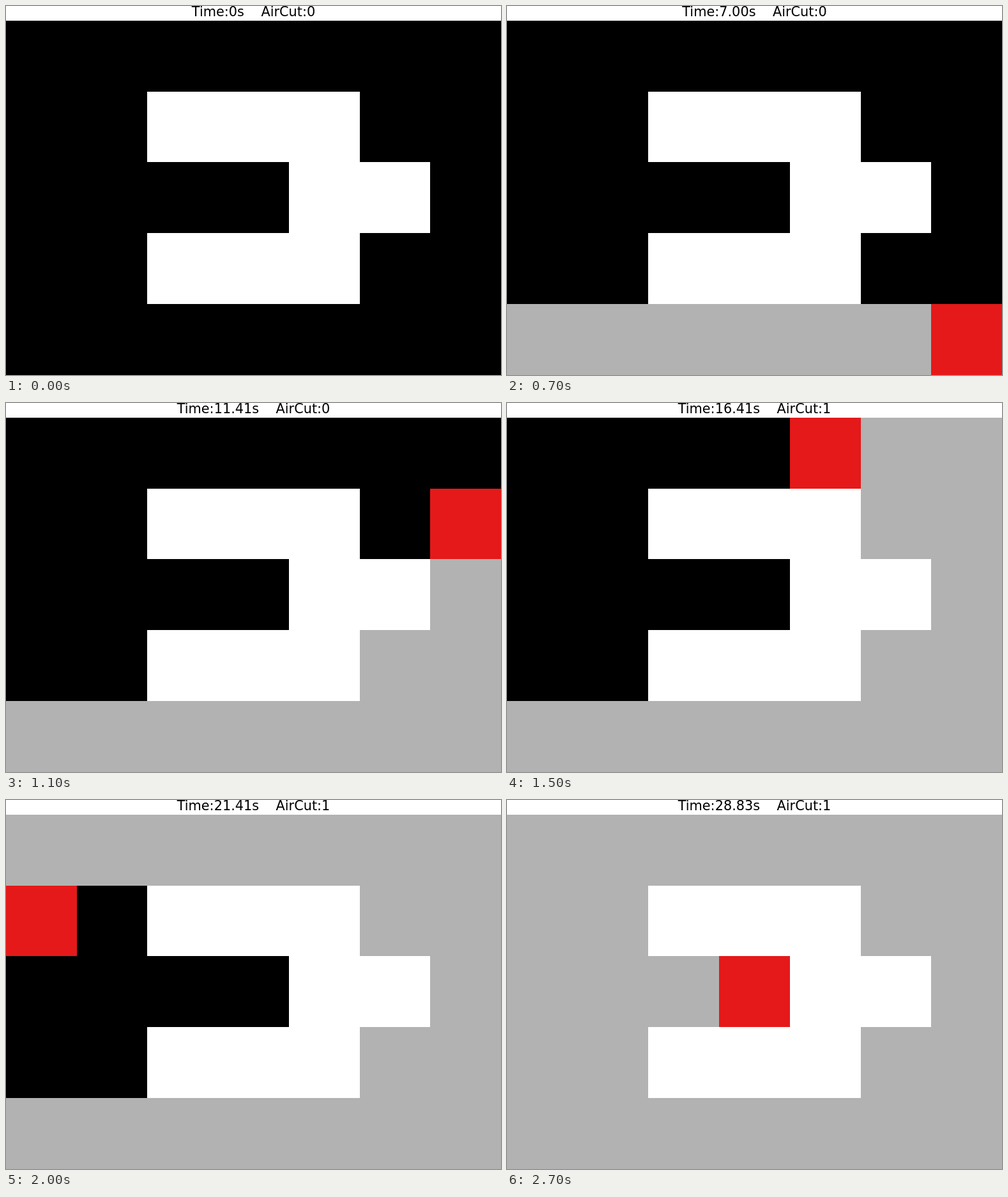
Recreate the animation shown at these times as an HTML page with a canvas. Size 775 by 577 pixels, loop 2.8 s.

```html
<!DOCTYPE html>
<html lang="en">
<head>
<meta charset="utf-8">
<title>Cutting path</title>
<style>
  html, body { margin: 0; width: 100%; height: 100%; overflow: hidden; background: #fff; }
  canvas { display: block; }
</style>
</head>
<body>
<canvas id="stage" width="775" height="577"></canvas>
<script>
const ctx = document.getElementById("stage").getContext("2d");
const STEP_MS = 100, CELL = 775 / 7, TOP = 23;
const UNCUT = "#000", PART = "#fff", CUT = "#b2b2b2", TOOL = "#e51919";

// Each pair is column, row.
const part = "21 31 41 42 52 23 33 43".split(" ");
const path = ("04 14 24 34 44 54 64 63 53 62 61 51 50 60 " +
  "40 30 20 10 00 01 11 12 02 03 13 22 32").split(" ");

// Title for every step: travelled distance and jumps over cut cells.
const titles = ["Time:0s    AirCut:0"];
let time = 0, airCut = 0;
path.forEach((cell, i) => {
  const from = path[i - 1];
  const distance = from ? Math.hypot(cell[0] - from[0], cell[1] - from[1]) : 1;
  time += distance;
  if (distance > 1.5) airCut++;
  titles.push(`Time:${time.toFixed(2)}s    AirCut:${airCut}`);
});

function fillCells(x, y, cols, rows, color) {
  const left = Math.round(x * CELL), top = Math.round(TOP + y * CELL);
  ctx.fillStyle = color;
  ctx.fillRect(left, top,
    Math.round((x + cols) * CELL) - left,
    Math.round(TOP + (y + rows) * CELL) - top);
}

function fillCell(cell, color) {
  fillCells(+cell[0], +cell[1], 1, 1, color);
}

function draw(step) {
  ctx.fillStyle = "#fff";
  ctx.fillRect(0, 0, 775, 577);
  fillCells(0, 0, 7, 5, UNCUT);
  part.forEach(cell => fillCell(cell, PART));
  path.slice(0, step).forEach((cell, i) => fillCell(cell, i === step - 1 ? TOOL : CUT));

  ctx.fillStyle = "#000";
  ctx.font = '20.83px "DejaVu Sans", sans-serif';
  ctx.textAlign = "center";
  ctx.fillText(titles[step], 387.5, 16);
}

const start = performance.now();
function tick() {
  const elapsed = performance.now() - start;
  draw(Math.floor(elapsed / STEP_MS) % titles.length);
  requestAnimationFrame(tick);
}
tick();
</script>
</body>
</html>
```
